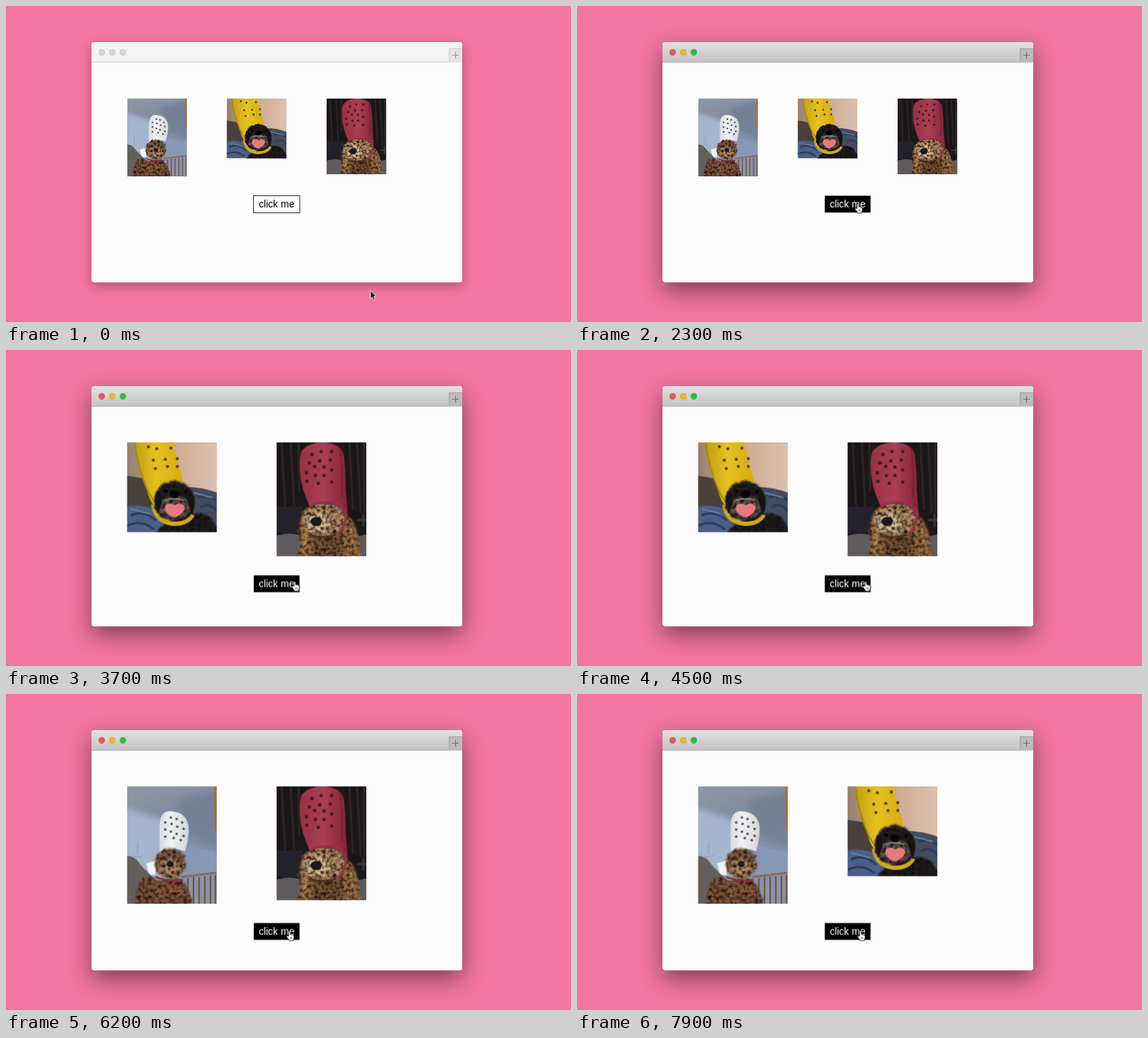
An HTML page for the animation above (8 s loop, 800 px wide and 447 px high).

```html
<!DOCTYPE html>
<html lang="en">
<head>
<meta charset="utf-8">
<title>Click me</title>
<style>
html, body { margin: 0; width: 100%; height: 100%; overflow: hidden; background: #f375a1; }
.window, svg.stage { position: absolute; left: 0; top: 0; }
.window {
  left: 121px; top: 51px; width: 525px; height: 339.6px;
  border-radius: 4px; overflow: hidden; background: #fefdfe;
}
.idle-win { box-shadow: 0 0 1px rgba(0,0,0,.4), 0 5px 15px rgba(0,0,0,.27); }
.live-win { box-shadow: 0 0 1px rgba(0,0,0,.4), 0 12px 32px rgba(0,0,0,.46); }
.bar { height: 28px; background: #f4f3f3; border-bottom: 1px solid #d4d2d3; }
.live-win .bar { background: linear-gradient(#e1e0e0, #c5c4c5); border-color: #aaa8a9; }
.tab {
  position: absolute; right: 0; top: 9px; width: 18px; height: 19px;
  background: #e7e5e4; border: solid #cdcbca; border-width: 1px 0 0 1px;
}
.live-win .tab { background: #bcbbbc; border-color: #a2a1a2; }
.tab::before, .tab::after { content: ""; position: absolute; background: #949293; }
.tab::before { left: 4px; top: 8px; width: 9px; height: 1px; }
.tab::after { left: 8px; top: 4px; width: 1px; height: 9px; }
.live-win .tab::before, .live-win .tab::after { background: #6d6c6d; }
.dot {
  position: absolute; top: 9.8px; width: 9px; height: 9px; border-radius: 50%;
  background: #d7d5d5; box-shadow: inset 0 0 0 .7px rgba(0,0,0,.1);
}
.dot:nth-of-type(1) { left: 9.7px; }
.dot:nth-of-type(2) { left: 25px; }
.dot:nth-of-type(3) { left: 40.2px; }
.live-win .dot:nth-of-type(1) { background: #ee5650; }
.live-win .dot:nth-of-type(2) { background: #f0b62e; }
.live-win .dot:nth-of-type(3) { background: #28bf42; }
text { font: 14px "Liberation Sans", Arial, sans-serif; }

/* Hard switches: every keyframe holds until the next one. */
.switch { opacity: 0; animation: 8s step-end infinite; }
.idle-win { animation-name: idle; }
.live-win { animation-name: live; }
.trio { animation-name: trio; }
.first { animation-name: first; }
.white { animation-name: white; }
.right-yellow { animation-name: right-yellow; }
.right-pink { animation-name: right-pink; }
.hover { animation-name: hover; }
.plain { animation-name: plain; }
.button { animation: drop 8s step-end infinite; }
.cursor { animation: travel 8s ease-in-out infinite; }

@keyframes idle { 0% { opacity: 1 } 20%, 100% { opacity: 0 } }
@keyframes live { 0% { opacity: 0 } 20%, 100% { opacity: 1 } }
@keyframes trio { 0% { opacity: 1 } 35%, 100% { opacity: 0 } }
@keyframes first { 0% { opacity: 0 } 35% { opacity: 1 } 57.5%, 100% { opacity: 0 } }
@keyframes white { 0% { opacity: 0 } 57.5%, 100% { opacity: 1 } }
@keyframes right-yellow {
  0% { opacity: 0 } 57.5% { opacity: 1 } 76.25% { opacity: 0 } 92.5%, 100% { opacity: 1 }
}
@keyframes right-pink {
  0% { opacity: 0 } 35% { opacity: 1 } 57.5% { opacity: 0 } 76.25% { opacity: 1 } 92.5%, 100% { opacity: 0 }
}
@keyframes hover { 0% { opacity: 0 } 20% { opacity: 1 } 35% { opacity: 0 } 40.6%, 100% { opacity: 1 } }
@keyframes plain { 0% { opacity: 1 } 20% { opacity: 0 } 35% { opacity: 1 } 40.6%, 100% { opacity: 0 } }
@keyframes drop {
  0% { transform: translateY(0) } 35% { transform: translateY(50.4px) }
  57.5%, 100% { transform: translateY(55.6px) }
}
@keyframes travel {
  0%, 3.75% { transform: translate(516px, 402.5px) }
  13.75%, 36.25% { transform: translate(398.3px, 279.5px) }
  42.5%, 58.75% { transform: translate(409.5px, 327.5px) }
  62.5%, 100% { transform: translate(402px, 335.5px) }
}
</style>
</head>
<body>
<div class="window idle-win switch">
  <div class="bar"><i class="dot"></i><i class="dot"></i><i class="dot"></i><b class="tab"></b></div>
</div>
<div class="window live-win switch">
  <div class="bar"><i class="dot"></i><i class="dot"></i><i class="dot"></i><b class="tab"></b></div>
</div>

<svg class="stage" width="800" height="447" viewBox="0 0 800 447">
  <defs>
    <filter id="soft" color-interpolation-filters="sRGB"><feGaussianBlur stdDeviation=".7"/></filter>
    <filter id="haze" color-interpolation-filters="sRGB" x="-30%" y="-30%" width="160%" height="160%"><feGaussianBlur stdDeviation="5"/></filter>
    <!-- Ragged edge and dark mottling -->
    <filter id="fur" color-interpolation-filters="sRGB" x="-10%" y="-10%" width="120%" height="120%">
      <feTurbulence type="fractalNoise" baseFrequency=".2" numOctaves="2" seed="4" result="noise"/>
      <feDisplacementMap in="SourceGraphic" in2="noise" scale="5" xChannelSelector="R" yChannelSelector="G"/>
      <feGaussianBlur stdDeviation=".8" result="coat"/>
      <feColorMatrix in="noise" values="0 0 0 0 .08  0 0 0 0 .05  0 0 0 0 .04  0 0 2.4 0 -.95"/>
      <feComposite in2="coat" operator="in" result="shade"/>
      <feMerge><feMergeNode in="coat"/><feMergeNode in="shade"/></feMerge>
    </filter>
    <linearGradient id="room" x1="0" y1="0" x2=".25" y2="1">
      <stop offset="0" stop-color="#8e98a6"/><stop offset=".35" stop-color="#7f8ba0"/>
      <stop offset="1" stop-color="#8494b2"/>
    </linearGradient>
    <linearGradient id="wall" x1="0" x2="1">
      <stop offset="0" stop-color="#97826f"/><stop offset=".55" stop-color="#cfad92"/><stop offset="1" stop-color="#dcc0b0"/>
    </linearGradient>
    <linearGradient id="lemon" x1="0" x2="1">
      <stop offset="0" stop-color="#c39c10"/><stop offset=".45" stop-color="#e6c11e"/><stop offset="1" stop-color="#d8aa10"/>
    </linearGradient>
    <linearGradient id="rose" x1="0" x2="1">
      <stop offset="0" stop-color="#963046"/><stop offset=".5" stop-color="#aa3e53"/><stop offset="1" stop-color="#842339"/>
    </linearGradient>
    <linearGradient id="snow" x1="0" x2="1">
      <stop offset="0" stop-color="#d9dce3"/><stop offset=".4" stop-color="#f0f1f3"/><stop offset="1" stop-color="#d3d5da"/>
    </linearGradient>

    <symbol id="white-clog" viewBox="0 0 127 166">
      <rect width="127" height="166" fill="url(#room)"/>
      <path d="M-5 30L55 48V130H-5Z" fill="#abbdd6" opacity=".85" filter="url(#haze)"/>
      <path d="M70 20L130 5V88L86 70Z" fill="#6d798d" opacity=".6" filter="url(#haze)"/>
      <path d="M84 84L127 93V126L80 124Z" fill="#8798b6" filter="url(#soft)"/>
      <path d="M123.500 0H127V62H124Z" fill="#a07238"/>
      <path d="M15 78V96M9 98Q15 103 22 97" stroke="#8796ac" fill="none"/>
      <path d="M27 109L40 105V125H31Z" fill="#eef5fb" filter="url(#soft)"/>
      <path d="M80 134H127V166H84Z" fill="#8b94a8"/>
      <path d="M86 130V160M94 128V166M102 128V166M110 127V166M118 126V166M125 125V166" stroke="#6f4c34" stroke-width="2"/>
      <path d="M77 128L127 122" stroke="#96694a" stroke-width="3"/>
      <path d="M0 98Q11 98 20 112L44 136V166H0Z" fill="#645f5b" filter="url(#soft)"/>
      <path d="M11 168Q13 133 27 128Q34 126 42 133L73 130Q89 142 93 168Z" fill="#7c5038" filter="url(#fur)"/>
      <path d="M42 137Q60 148 78 140L82 158Q60 152 40 161Z" fill="#8c5b40" filter="url(#fur)"/>
      <path d="M40 128Q62 136 79 132" fill="none" stroke="#8c2c3a" stroke-width="2.500" filter="url(#soft)"/>
      <path d="M46 92V58Q46 36 59 35Q84 35 87 57Q88 72 82 92Q64 84 46 92Z" fill="url(#snow)" filter="url(#soft)"/>
      <path d="M62 44h0M70 46h0M78 51h0M54 51h0M63 53h0M71 57h0M80 60h0M54 61h0M62 64h0M70 67h0M80 70h0M54 71h0M66 73h0M76 76h0" stroke="#484848" stroke-width="3.600" stroke-linecap="round"/>
      <ellipse cx="61" cy="109" rx="22" ry="21" fill="#a0764f" filter="url(#fur)"/>
      <path d="M41 98Q61 83 82 98L79 107Q61 96 44 107Z" fill="#785640" filter="url(#fur)"/>
      <ellipse cx="61" cy="115" rx="13" ry="10" fill="#b38965" filter="url(#fur)"/>
      <path d="M53 103h0M70 103h0" stroke="#241c1b" stroke-width="5" stroke-linecap="round" filter="url(#soft)"/>
      <ellipse cx="61" cy="110" rx="5" ry="4.300" fill="#211a1d"/>
      <path d="M56 119H66" stroke="#4a2f28" stroke-width="2.500" filter="url(#soft)"/>
    </symbol>

    <symbol id="yellow-clog" viewBox="0 0 127 127">
      <rect width="127" height="127" fill="url(#wall)"/>
      <path d="M0 47L42 54V94H0Z" fill="#48413d" filter="url(#soft)"/>
      <path d="M78 63Q104 62 127 71V127H62Z" fill="#434b5f" filter="url(#soft)"/>
      <path d="M0 91Q20 86 48 98L62 127H0Z" fill="#4a5f88" filter="url(#soft)"/>
      <path d="M5 103Q24 95 41 111M0 118Q20 108 38 123M100 78Q116 72 127 83M104 92Q116 83 127 97" fill="none" stroke="#2f3b57" stroke-width="3" filter="url(#soft)"/>
      <path d="M94 71L121 78M5 94L32 101" stroke="#6a7fa4" stroke-width="2" filter="url(#soft)"/>
      <path d="M10 0H65Q69 22 77 45L80 66L43 96Q31 82 29 70Q13 32 10 0Z" fill="url(#lemon)"/>
      <path d="M11 0Q14 33 30 70L39 85" fill="none" stroke="#a88408" stroke-width="2"/>
      <path d="M30 6h0M42 9h0M62 8h0M37 25h0M54 24h0M71 23h0M40 37h0M57 34h0M71 34h0" stroke="#54431a" stroke-width="4.500" stroke-linecap="round"/>
      <path d="M42 129Q50 111 65 110Q92 97 111 102Q124 108 129 129Z" fill="#1c1b1e" filter="url(#fur)"/>
      <path d="M37 88Q40 112 65 115Q85 116 93 102" fill="none" stroke="#cfaa18" stroke-width="6"/>
      <path d="M40 96Q35 72 49 60Q67 49 84 60Q99 73 94 96L87 106Q68 114 48 105Z" fill="#201e1f" filter="url(#fur)"/>
      <path d="M47 84Q56 74 67 79Q79 72 87 84L89 99Q78 108 67 108Q52 106 46 98Z" fill="#5f5650" filter="url(#fur)"/>
      <path d="M42 68Q36 84 43 101L50 82ZM88 66Q100 80 92 103L85 80Z" fill="#141415" filter="url(#soft)"/>
      <ellipse cx="67" cy="73" rx="7" ry="5.500" fill="#080809"/>
      <path d="M55 69h0M83 70h0" stroke="#050506" stroke-width="5" stroke-linecap="round"/>
      <path d="M54 82Q67 77 80 82" stroke="#8d837b" stroke-width="2" fill="none" filter="url(#soft)"/>
      <path d="M67 89Q74 84 80 89Q84 95 75 102Q67 109 60 103Q50 95 55 88Q62 85 67 89Z" fill="#ea7880" filter="url(#soft)"/>
    </symbol>

    <symbol id="pink-clog" viewBox="0 0 127 161">
      <rect width="127" height="161" fill="#1b1718"/>
      <path d="M7 0L12 90M20 0L25 90M31 0L32 70M103 0L108 95M114 0L119 100M124 0V100" stroke="#2b2627" stroke-width="3" filter="url(#soft)"/>
      <path d="M0 91H37V128H0Z" fill="#23222a" filter="url(#soft)"/>
      <path d="M123 101V119M114 110H127" stroke="#3a383e" stroke-width="3" filter="url(#soft)"/>
      <path d="M0 132Q18 126 36 132L45 161H0ZM110 134L127 130V161H105Z" fill="#5f5a5d" filter="url(#soft)"/>
      <path d="M35 163Q37 126 53 124H94Q111 130 115 163Z" fill="#755033" filter="url(#fur)"/>
      <path d="M38 100Q28 116 33 143L29 162H49Q55 144 49 130L50 108ZM96 100Q114 113 116 137L119 162H94Q99 141 90 128Z" fill="#94693f" filter="url(#fur)"/>
      <path d="M38 122Q43 137 38 155M103 121Q110 136 106 154" stroke="#c0965f" stroke-width="3" fill="none" filter="url(#fur)"/>
      <path d="M37 98Q51 85 72 87Q94 87 97 109Q94 128 76 133Q49 137 39 120Z" fill="#b38c62" filter="url(#fur)"/>
      <path d="M40 106Q52 96 63 100L77 108Q79 122 66 127Q48 130 42 121Z" fill="#d6b88f" filter="url(#fur)"/>
      <path d="M46 130Q62 139 84 130" stroke="#4a3020" stroke-width="4" fill="none" filter="url(#soft)"/>
      <path d="M47 91Q37 70 34 51Q31 24 35 13Q44 0 68 0Q91 2 95 17Q98 43 98 67L101 105Q94 92 82 88Q64 83 47 91Z" fill="url(#rose)" filter="url(#soft)"/>
      <path d="M47 90Q65 82 82 86Q97 89 98 105Q96 120 87 130" fill="none" stroke="#98304a" stroke-width="3.500" filter="url(#soft)"/>
      <path d="M90 8Q95 40 92 79" fill="none" stroke="#6d1a30" stroke-width="3" opacity=".5" filter="url(#soft)"/>
      <path d="M50 17h0M63 13h0M78 13h0M46 29h0M61 26h0M76 25h0M42 43h0M54 34h0M67 35h0M43 55h0M55 47h0M67 47h0M78 39h0M59 58h0M78 56h0" stroke="#451a26" stroke-width="5" stroke-linecap="round"/>
      <ellipse cx="56" cy="112" rx="8" ry="6.500" fill="#1d1719" filter="url(#soft)"/>
      <path d="M46 101h0M79 97h0" stroke="#30201a" stroke-width="5" stroke-linecap="round" filter="url(#soft)"/>
      <path d="M56 121H68" stroke="#80603f" stroke-width="2" filter="url(#soft)"/>
    </symbol>
  </defs>

  <g class="trio switch">
    <use href="#white-clog" x="171.500" y="130.700" width="84.700" height="110.300"/>
    <use href="#yellow-clog" x="312.500" y="130.700" width="84.700" height="84.700"/>
    <use href="#pink-clog" x="453.800" y="130.700" width="84.700" height="107.300"/>
  </g>
  <use class="first switch" href="#yellow-clog" x="171.500" y="130.700" width="127" height="127"/>
  <use class="white switch" href="#white-clog" x="171.500" y="130.700" width="127" height="166"/>
  <use class="right-yellow switch" href="#yellow-clog" x="383.200" y="130.700" width="127" height="127"/>
  <use class="right-pink switch" href="#pink-clog" x="383.200" y="130.700" width="127" height="161"/>

  <g class="button">
    <g class="plain switch">
      <rect x="350.500" y="268.300" width="65.500" height="24.300" fill="#fefdfe" stroke="#222"/>
      <text x="357.900" y="284.700">click me</text>
    </g>
    <g class="hover switch">
      <rect x="350.800" y="268.400" width="64.800" height="23.800"/>
      <text x="357.900" y="284.700" fill="#fff">click me</text>
    </g>
  </g>

  <g class="cursor">
    <path class="plain switch" d="M0 0V11.500L2.600 9.200L4.500 13.300L6.500 12.400L4.700 8.400H8Z" fill="#000" stroke="#fff" stroke-width=".9"/>
    <path class="hover switch" d="M-1.800 7V1.300Q-1.600 0 -.7 0Q.4 0 .5 1.300V4.600Q1.600 3.900 2.500 5Q3.600 4.400 4.300 5.500Q5.700 5.100 5.900 6.700V9.200Q5.700 11 4.700 12V13.500H-1.200V12.300Q-3.800 9.500 -4.700 7.700Q-4.600 6.200 -3.300 6.400Z M.8 8.500V11M2.700 8.500V11" fill="#fff" stroke="#111" stroke-width=".8" stroke-linejoin="round"/>
  </g>
</svg>
</body>
</html>
```
